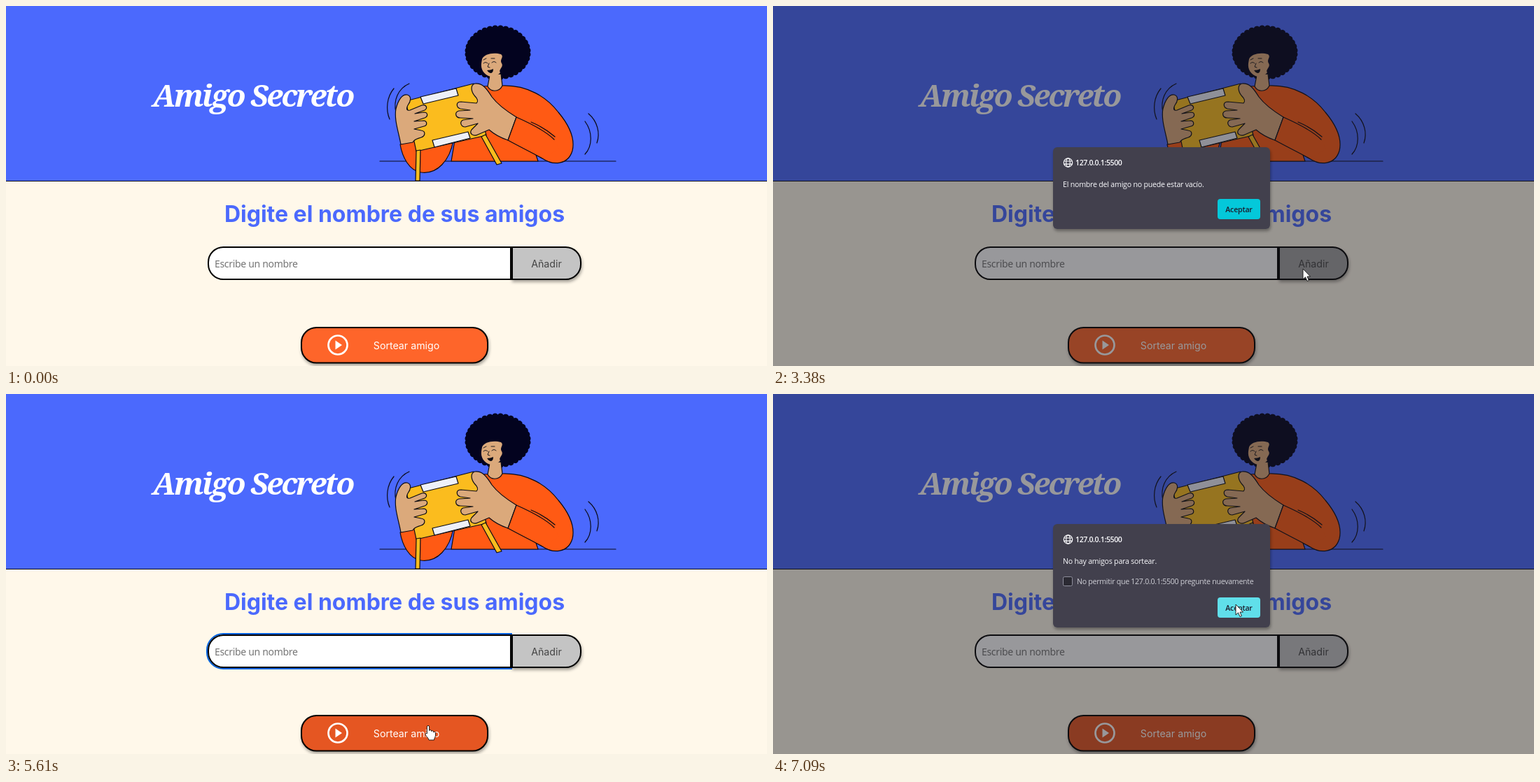
Recreate the animation shown at these times as an HTML page. Size 1087 px wide and 515 px high, loop 8000 ms.

```html
<!DOCTYPE html>
<html lang="es">
<head>
<meta charset="utf-8">
<title>Amigo Secreto</title>
<style>
  html, body { margin: 0; width: 100%; height: 100%; overflow: hidden; background: #fff8ea; }
  svg { display: block; width: 100vw; height: 100vh; }
  .title { font: italic 900 44px "Noto Serif", serif; letter-spacing: -2.6px; fill: #fff; }
  .head { font: 700 32px Inter, sans-serif; fill: #4b69fd; }
  .btn { font: 14.2px Inter, sans-serif; }
  .hint { font: 14px "Noto Sans", sans-serif; letter-spacing: -.32px; fill: #757575; }
  .box text { font: 10.6px "Open Sans", sans-serif; letter-spacing: -.21px; fill: #fbfbfe; }
  .box .host { font-weight: 600; letter-spacing: -.4px; }
  .box .ok { font-weight: 600; fill: #1c1b2b; }
  .box .soft { letter-spacing: -.27px; fill: #cfcfd6; }
  .ink { stroke: #0a0a14; stroke-width: 1.2; stroke-linejoin: round; stroke-linecap: round; }
  .skin { fill: #dba97b; }
  .shirt { fill: #ff5a14; }
  .gold { fill: #fbbc1e; }
  .tape { fill: #eef0f8; }
  .line { fill: none; }
  .edge { stroke: #000; stroke-width: 2; }
</style>
</head>
<body>
<svg viewBox="0 0 1087 515" preserveAspectRatio="none">
  <defs>
    <filter id="drop" x="-20%" y="-30%" width="140%" height="180%">
      <feDropShadow dx="1" dy="3" stdDeviation="2" flood-opacity=".35"/>
    </filter>
    <g id="globe" fill="none" stroke="#fbfbfe" stroke-width="1.2">
      <circle r="6.2"/><ellipse rx="2.8" ry="6.2"/><path d="M-6-2H6M-6 2.2H6"/>
    </g>
  </defs>

  <rect width="1087" height="515" fill="#fff8ea"/>
  <rect width="1087" height="250" fill="#4b69fd"/>
  <rect y="250" width="1087" height="1" fill="#0a0a14"/>
  <text class="title" x="352.500" y="144" text-anchor="middle">Amigo Secreto</text>

  <g class="ink">
    <path class="line" d="M534 222H871"/>
    <path class="line" d="M554 118C544 130 542 148 548 162M576 111C560 118 553 135 557 152"/>
    <path class="line" d="M832 154C845 165 849 182 844 196M827 165C838 180 838 200 827 212"/>
    <path id="hair" fill="#03031f" stroke="none"/>
    <path class="shirt" d="M678 115L709 114C745 113 772 130 789 152C804 170 813 190 809 207C803 227 782 229 766 218L757 213L760 222H636L642 186Z"/>
    <path class="skin" d="M691 99L688 115C692 123 704 124 709 114L707 97Z"/>
    <path class="skin" stroke="none" d="M680 76C683 68 697 66 707 69Q710 71 708 75T708 82T707 89T706 95C703 99 698 101 692 101C682 98 678 90 679 82Z"/>
    <path class="line" stroke-width=".9" d="M682 82Q685 79 688 82M694 81Q697 78 700 81M682 77L686 75M693 75L698 75M690 82L688 87L691 88"/>
    <path d="M687 92Q692 92 696 90Q696 96 692 96Q689 95 687 92Z" fill="#0a0a14" stroke="none"/>

    <path class="shirt" d="M563 198C566 216 576 236 593 238C616 241 634 221 639 192L588 190Z"/>
    <path class="gold" d="M571 136L668 111L686 185L586 208Z"/>
    <path class="tape" d="M592 130L643 118L646 128L596 140Z"/>
    <path class="tape" d="M609 192L660 180L663 189L612 202Z"/>
    <path class="gold" d="M586 207L592 206L591 250H585Z"/>
    <path class="gold" d="M679 187L685 184L708 225L701 227Z"/>

    <path class="skin" d="M564 198C561 181 554 162 557 147C560 136 565 126 573 127C580 129 578 137 574 142C571 148 573 150 577 149L594 142C600 140 603 146 598 149L584 154L597 152C603 152 603 158 598 160L583 165L597 164C602 165 602 171 597 172L583 176L593 178C600 179 599 186 593 188C588 190 584 190 581 195Z"/>
    <path class="skin" d="M729 159C716 151 703 142 694 130C686 117 680 110 670 111C663 113 664 121 669 128C674 133 675 136 672 139L650 137C642 137 643 145 649 147L663 149L647 150C640 152 642 160 649 160L667 161L653 163C647 166 650 173 656 173L674 168L665 177C661 183 668 187 674 184L690 177C698 184 708 189 717 192Z"/>
    <path class="shirt" stroke="none" d="M729 159L783 190L790 205L766 218L717 192Z"/>
    <path class="line" d="M783 191C770 178 747 167 729 159L717 192C737 203 750 209 766 218M750 166Q769 174 784 187"/>
  </g>

  <text class="head" x="555" y="309" text-anchor="middle">Digite el nombre de sus amigos</text>

  <path id="ring" d="M723 343H310.500A23.500 23.500 0 0 0 287 366.500V369.500A23.500 23.500 0 0 0 310.500 393H723" fill="none" stroke="#0060df" stroke-width="2"/>
  <path class="edge" fill="#fff" d="M721 345H310.500A21.500 21.500 0 0 0 289 366.500V369.500A21.500 21.500 0 0 0 310.500 391H721Z"/>
  <text class="hint" x="298" y="374">Escribe un nombre</text>
  <rect id="caret" x="298" y="361" width="1" height="15" fill="#000"/>
  <path id="add" class="edge" filter="url(#drop)" d="M723 345H799.500A21.500 21.500 0 0 1 821 366.500V369.500A21.500 21.500 0 0 1 799.500 391H723Z"/>
  <text class="btn" x="772" y="373.500" text-anchor="middle" fill="#444">Añadir</text>

  <rect id="sort" class="edge" filter="url(#drop)" x="422" y="460" width="266" height="50.500" rx="21.500"/>
  <circle cx="474" cy="485" r="13.500" fill="none" stroke="#fff" stroke-width="2.700"/>
  <path d="M470.500 478.500L480 485L470.500 491.500Z" fill="#fff"/>
  <text class="btn" x="572" y="490.700" text-anchor="middle" fill="#fff">Sortear amigo</text>

  <rect id="dim" width="1087" height="515" fill="#1c1b22" opacity=".45"/>

  <g id="empty" class="box">
    <rect x="400" y="202" width="310" height="117" rx="6" fill="#42414d" filter="url(#drop)"/>
    <use href="#globe" x="421.500" y="224"/>
    <text class="host" x="432" y="228">127.0.0.1:5500</text>
    <text x="414" y="259">El nombre del amigo no puede estar vacío.</text>
    <rect class="face" x="635" y="276" width="61" height="29" rx="4"/>
    <text class="ok" x="665.500" y="295" text-anchor="middle">Aceptar</text>
  </g>
  <g id="none" class="box">
    <rect x="400" y="186" width="310" height="148" rx="6" fill="#42414d" filter="url(#drop)"/>
    <use href="#globe" x="421.500" y="208"/>
    <text class="host" x="432" y="212">127.0.0.1:5500</text>
    <text x="414" y="243">No hay amigos para sortear.</text>
    <rect x="414.500" y="261.500" width="13" height="13" rx="2" fill="#2b2a33" stroke="#8f8f9d"/>
    <text class="soft" x="434" y="272">No permitir que 127.0.0.1:5500 pregunte nuevamente</text>
    <rect class="face" x="635" y="291" width="61" height="29" rx="4"/>
    <text class="ok" x="665.500" y="310" text-anchor="middle">Aceptar</text>
  </g>

  <path id="cursor" fill="#fff" stroke="#111" stroke-width=".9" stroke-linejoin="round"/>
</svg>
<script>
const LOOP = 8000;
const $ = id => document.getElementById(id);
const show = (id, on) => { $(id).style.display = on ? '' : 'none'; };

const SHAPES = {
  arrow: 'M0 0V15L3.5 11.8L6 17.5L8.4 16.5L6 11H10.5Z',
  hand: 'M-1.6 12V2a1.6 1.6 0 0 1 3.2 0V7.6c.3-1.6 3-1.4 3 .4v.6c.4-1.4 3-1.2 3 .5v.8c.6-1.2 2.9-.9 2.9 .9V14c0 3-2 4-2 7H1c0-2.5-5-6-5-8.5 0-1.6 1.6-1.8 2.4-.5Z',
  beam: 'M-3-8H3M0-8V8M-3 8H3'
};

// Pointer moves: start, end, target x, target y
const START = [1024, 506];
const MOVES = [
  [400, 1000, 797, 384],
  [1150, 1210, 795, 383],
  [1410, 1530, 755, 404],
  [2090, 2460, 757, 376],
  [3590, 4210, 651, 292],
  [4820, 5610, 603, 474],
  [5680, 5820, 605, 476],
  [6840, 7090, 661, 301]
];

function pointer(t) {
  let [x, y] = START;
  for (const [t0, t1, tx, ty] of MOVES) {
    if (t <= t0) break;
    const u = Math.min(1, (t - t0) / (t1 - t0));
    const k = u * u * (3 - 2 * u);
    x += (tx - x) * k;
    y += (ty - y) * k;
  }
  return [x, y];
}

// Scalloped outline of the hair
function hairPath() {
  const n = 36;
  let d = '';
  for (let i = 0; i <= n; i++) {
    const a = i / n * Math.PI * 2;
    const x = (702.5 + 46 * Math.cos(a)).toFixed(1);
    const y = (66.5 + 37 * Math.sin(a)).toFixed(1);
    d += i ? `A4.6 4.6 0 0 1 ${x} ${y}` : `M${x} ${y}`;
  }
  return d + 'Z';
}
$('hair').setAttribute('d', hairPath());

function render(t) {
  const [x, y] = pointer(t);
  const over = (l, top, r, b) => x >= l && x <= r && y >= top && y <= b;
  const first = t >= 3380 && t < 4620;
  const second = t >= 6620;
  const modal = first || second;
  const onAdd = first || (!modal && t >= 400 && over(722, 344, 822, 392));
  const onSort = second || (!modal && over(421, 459, 689, 511));
  const focus = t >= 4620 && t < 6300;
  const blink = t >= 5680 || t < 5150;

  $('add').setAttribute('fill', onAdd ? '#a1a1a1' : '#c4c4c4');
  $('sort').setAttribute('fill', onSort ? '#e55720' : '#fe652b');
  show('ring', focus);
  show('caret', focus && blink);
  show('dim', modal);
  show('empty', first);
  show('none', second);

  const onOk = over(635, second ? 291 : 276, 696, second ? 320 : 305);
  const face = first && t >= 4480 ? '#98eef4' : onOk ? '#60dfea' : '#04c8da';
  document.querySelectorAll('.face').forEach(el => el.setAttribute('fill', face));

  let kind = 'arrow';
  if (!modal && t < 6560) {
    if (onAdd || onSort || (t >= 4620 && t <= 4820)) kind = 'hand';
    else if (over(288, 344, 721, 392)) kind = 'beam';
  }
  const cursor = $('cursor');
  show('cursor', t >= 400);
  cursor.setAttribute('d', SHAPES[kind]);
  cursor.setAttribute('transform', `translate(${x.toFixed(2)} ${y.toFixed(2)})`);
}

function tick() {
  render(performance.now() % LOOP);
  requestAnimationFrame(tick);
}
tick();
</script>
</body>
</html>
```
